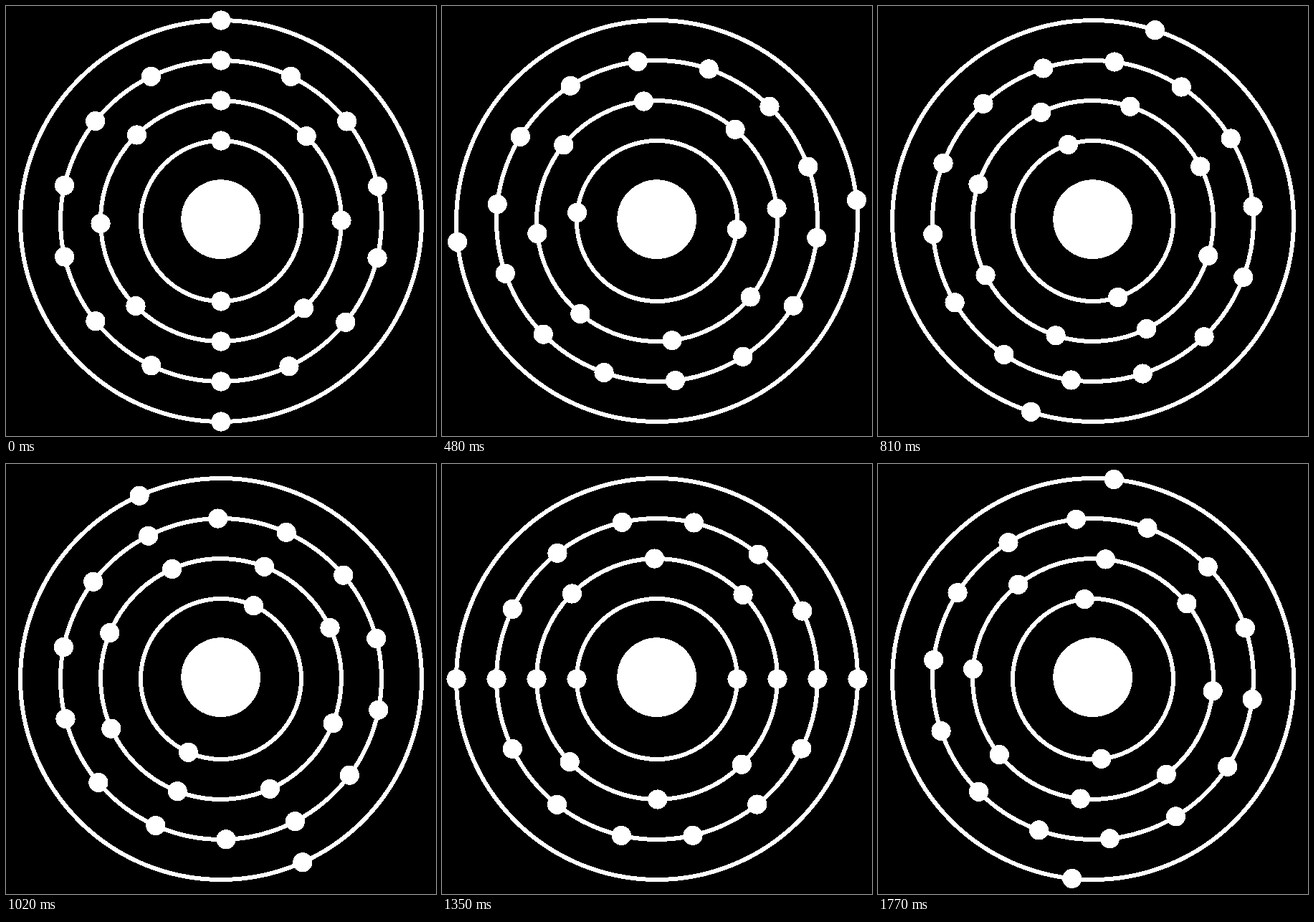
Recreate the animation shown at these times as an HTML page. Size 600 px wide and 600 px high, loop 1800 ms.

```html
<!DOCTYPE html>
<html lang="en">
<head>
<meta charset="utf-8">
<title>Electron shells</title>
<style>
  html, body { margin: 0; width: 100%; height: 100%; overflow: hidden; background: #000; }
  svg { display: block; width: 100vw; height: 100vh; shape-rendering: crispEdges; }
</style>
</head>
<body>
<svg id="atom" viewBox="0 0 600 600" fill="#fff">
  <circle cx="299.7" cy="297.7" r="55.4"/>
</svg>
<script>
const LOOP = 1800, STEP = 30;
const CENTER = 300, ELECTRON_RADIUS = 13.6, ORBIT_WIDTH = 6;

// Angles are degrees clockwise from the top; turn is the direction of travel.
const shells = [
  { radius: 112, turn: 1, angles: [0, 180] },
  { radius: 168, turn: -1, angles: [0, 45.2, 89.7, 136.5, 180, 225.1, 268.8, 315.6] },
  { radius: 224, turn: 1, angles: Array.from({ length: 14 }, (_, i) => i < 7 ? i * 25.82 : 180 + (i - 7) * 25.7) },
  { radius: 280, turn: -1, angles: [0, 180] }
];

const atom = document.getElementById("atom");

function addCircle(attributes) {
  const circle = document.createElementNS("http://www.w3.org/2000/svg", "circle");
  for (const [name, value] of Object.entries(attributes)) circle.setAttribute(name, value);
  return atom.appendChild(circle);
}

for (const shell of shells) {
  addCircle({
    cx: CENTER, cy: CENTER, r: shell.radius,
    fill: "none", stroke: "#fff", "stroke-width": ORBIT_WIDTH
  });
  shell.electrons = shell.angles.map(() => addCircle({ r: ELECTRON_RADIUS }));
}

function draw(time) {
  const rotation = Math.floor((time % LOOP) / STEP) * STEP / LOOP * 360;
  for (const { radius, turn, angles, electrons } of shells) {
    electrons.forEach((electron, i) => {
      const angle = (angles[i] + turn * rotation) * Math.PI / 180;
      electron.setAttribute("cx", CENTER + radius * Math.sin(angle));
      electron.setAttribute("cy", CENTER - radius * Math.cos(angle));
    });
  }
}

const start = performance.now();
function tick() {
  draw(performance.now() - start);
  requestAnimationFrame(tick);
}
tick();
</script>
</body>
</html>
```
